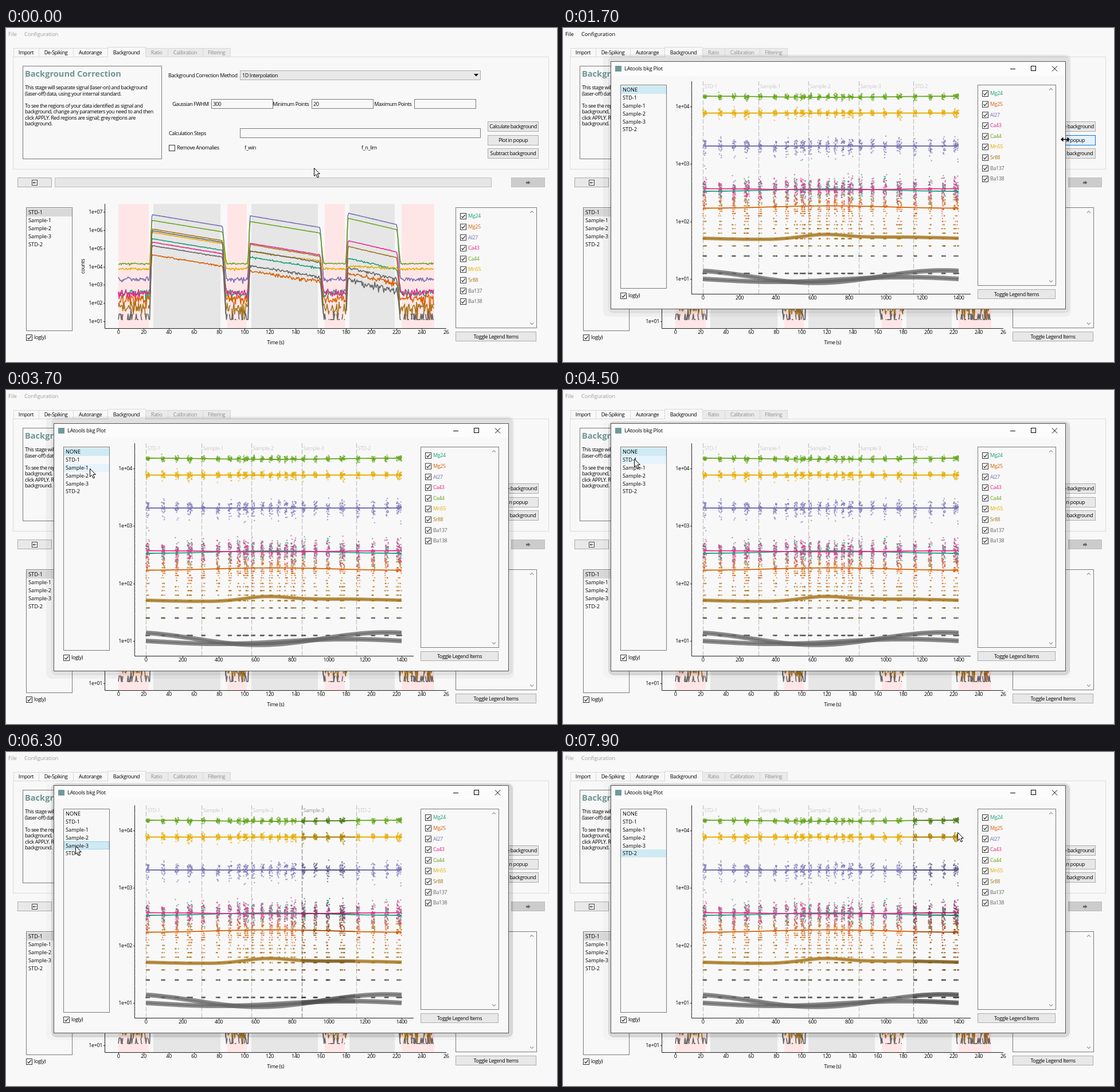
An HTML page with a canvas for the animation above (8 s loop, 961 by 583 pixels).

```html
<!DOCTYPE html>
<html lang="en">
<head>
<meta charset="utf-8">
<title>Background correction</title>
<style>
html, body { margin: 0; width: 100%; height: 100%; overflow: hidden; background: #f8f8f8; }
canvas { display: block; }
</style>
</head>
<body>
<canvas id="stage" width="961" height="583"></canvas>
<script>
const W = 961, H = 583, LOOP = 8000, BG = '#f8f8f8', EDGE = '#7a7a7a', ROW = 13.8;
const stage = document.getElementById('stage').getContext('2d');
let g = stage;

// ---------- drawing helpers ----------
function layer(draw) {
  const c = document.createElement('canvas');
  c.width = W; c.height = H;
  const old = g;
  g = c.getContext('2d');
  draw();
  g = old;
  return c;
}
function text(s, x, y, { color = '#000', align = 'left', size = 9, bold = false, space = -0.4 } = {}) {
  g.font = `${bold ? 'bold ' : ''}${size}px "Open Sans", "Noto Sans", sans-serif`;
  g.letterSpacing = space + 'px';
  g.textAlign = align;
  g.fillStyle = color;
  g.fillText(s, x, y + size * 0.36);
}
function box(x, y, w, h, fill, stroke) {
  if (fill) { g.fillStyle = fill; g.fillRect(x, y, w, h); }
  if (stroke) { g.strokeStyle = stroke; g.lineWidth = 1; g.strokeRect(x + 0.5, y + 0.5, w - 1, h - 1); }
}
function trail(p) {
  g.beginPath();
  for (let i = 0; i < p.length; i += 2) g.lineTo(p[i], p[i + 1]);
}
function line(color, width, ...p) {
  g.strokeStyle = color; g.lineWidth = width;
  trail(p); g.stroke();
}
function poly(fill, ...p) {
  g.fillStyle = fill;
  trail(p); g.closePath(); g.fill();
}
function button(label, x, y, w, h, hot) {
  box(x, y, w, h, hot ? '#e5f1fb' : '#e8e8e8', hot ? '#0078d7' : '#adadad');
  text(label, x + w / 2, y + h / 2, { align: 'center' });
}
function check(x, y, label, on = true, color) {
  box(x, y - 5, 11, 11, '#fff', '#333');
  if (on) line('#222', 1.2, x + 2.5, y + 0.5, x + 4.5, y + 3, x + 8.8, y - 2.2);
  text(label, x + 14, y, { color });
}
function chevron(x, y, d) { line('#999', 1.2, x - 3, y + d, x, y - d, x + 3, y + d); }
function list(names, x, y) {
  names.forEach((s, i) => text(s, x, y + i * ROW, { size: 9.2, space: 0 }));
}
function legend(x, y, w, h) {
  box(x, y, w, h, BG, EDGE);
  series.forEach((s, i) => check(x + 8, y + 15 + i * 18.63, s.name, true, s.color));
  chevron(x + w - 9, y + 8, 1.5);
  chevron(x + w - 9, y + h - 8, -1.5);
}

// ---------- data ----------
let seed = 7;
function rand() {
  seed = (seed + 0x6D2B79F5) | 0;
  let t = Math.imul(seed ^ seed >>> 15, 1 | seed);
  t = t + Math.imul(t ^ t >>> 7, 61 | t) ^ t;
  return ((t ^ t >>> 14) >>> 0) / 4294967296;
}
const gauss = () => Math.sqrt(-2 * Math.log(1 - rand())) * Math.cos(6.2832 * rand());
// a noisy reading in steps of 12.5, as log10, or null for zero
function reading(mean) {
  const n = mean / 12.5, spread = 1 + Math.min(1, n / 60);
  const k = Math.round(n + gauss() * Math.sqrt(n) * spread);
  return k > 0 ? Math.log10(k * 12.5) : null;
}
const smooth = v => (v = Math.max(0, Math.min(1, v)), v * v * (3 - 2 * v));
const mainY = log => 512 - (log - 1) * 31.8;
const popY = log => 438 - (log - 1) * 100.4;

// y: height of the background fit, cos, sin and bump: its bends, peaks: tops of the three signals
const series = [
  { name: 'Mg24', color: '#1b9e77', y: 283, cos: 2, peaks: [367, 399, 401] },
  { name: 'Mg25', color: '#d95f02', y: 312.5, cos: 2, peaks: [395, 424, 427] },
  { name: 'Al27', color: '#7570b3', y: 206, peaks: [325, 327, 322] },
  { name: 'Ca43', color: '#e7298a', y: 281.5, cos: -1, peaks: [373, 375, 370] },
  { name: 'Ca44', color: '#66a61e', y: 120, cos: -1, peaks: [335, 337, 331] },
  { name: 'Mn55', color: '#e6ab02', y: 148.5, peaks: [356, 391, 430] },
  { name: 'Sr88', color: '#a6761d', y: 367, sin: 2, bump: -7, band: 6, peaks: [350, 377, 380] },
  { name: 'Ba137', color: '#666666', y: 439, cos: -1, sin: 4, band: 8, peaks: [379, 414, 438] },
  { name: 'Ba138', color: '#666666', y: 434, cos: -10, sin: 4, band: 8, peaks: [353, 388, 417] }
];
for (const s of series) s.base = 10 ** (1 + (438 - s.y) / 100.4);
const spans = [[250, 377], [421, 547], [592, 681]];

// signal adds to the background; it drops 21 px over each span
function meanAt(s, x) {
  let log = Math.log10(s.base);
  spans.forEach(([a, b], i) => {
    const on = smooth((x - a) / 5) * smooth((b + 8 - x) / 8);
    const signal = 10 ** (1 + (512 - s.peaks[i] - 21 * (x - a) / (b - a)) / 31.8);
    log += on * Math.log10(1 + signal / s.base);
  });
  return 10 ** log;
}
function trace(s) {
  g.strokeStyle = s.color; g.lineWidth = 1.6; g.lineJoin = 'round';
  g.beginPath();
  let pen = false;
  for (let x = 196; x <= 747; x += 1.3) {
    const v = reading(meanAt(s, x));
    if (v !== null) pen ? g.lineTo(x, mainY(v)) : g.moveTo(x, mainY(v));
    pen = v !== null;
  }
  g.stroke();
}
function fitLine(s, color, width) {
  const p = [];
  for (let u = 0; u <= 1.001; u += 0.02) {
    const a = u * 2 * Math.PI;
    p.push(244 + 446 * u, s.y + (s.cos || 0) * Math.cos(a) + (s.sin || 0) * Math.sin(a)
      + (s.bump || 0) * Math.exp(-(((u - 0.47) / 0.12) ** 2)));
  }
  line(color, width, ...p);
}

// first and last gap, number of gaps, and how much their spacing shrinks
const samples = [
  { name: 'STD-1', x: 244, last: 316, gaps: 4, bend: 0.2 },
  { name: 'Sample-1', x: 341, last: 414, gaps: 5, bend: 0.55 },
  { name: 'Sample-2', x: 428, last: 497, gaps: 6, bend: 0.2 },
  { name: 'Sample-3', x: 516, last: 582, gaps: 4, bend: -0.1 },
  { name: 'STD-2', x: 611, last: 681, gaps: 4, bend: 0.2 }
];
const names = samples.map(s => s.name);

// ---------- main window ----------
const mainWindow = layer(() => {
  box(0, 0, W, H, BG);
  box(12, 50, 935, 197, BG, '#dcdcdc');
  const tabs = [['Import', 13], ['De-Spiking', 57], ['Autorange', 117], ['Background', 177],
    ['Ratio', 243], ['Calibration', 282], ['Filtering', 343]];
  tabs.forEach(([name, x], i) => {
    const end = i < 6 ? tabs[i + 1][1] : 391, on = i === 3, off = i > 3;
    box(x, on ? 33 : 35, end - x + 1, on ? 18 : 16, off ? '#eaeaea' : BG, '#d9d9d9');
    if (on) box(x + 1, 50, end - x - 1, 1, BG);
    text(name, (x + end) / 2, on ? 42.5 : 43, { align: 'center', color: off ? '#8f8f8f' : '#000' });
  });

  box(29, 66, 243, 163, BG, EDGE);
  text('Background Correction', 33, 80, { size: 14.6, bold: true, color: '#6f9595', space: 0 });
  ['This stage will separate signal (laser-on) and background',
    '(laser-off) data, using your internal standard.', '',
    'To see the regions of your data identified as signal and',
    'background, change any parameters you need to and then',
    'click APPLY. Red regions are signal; grey regions are',
    'background.'].forEach((s, i) => text(s, 33, 104 + i * 10.5));

  text('Background Correction Method', 283, 83);
  box(408, 74, 420, 17, '#e8e8e8', '#adadad');
  text('1D Interpolation', 412, 83);
  poly('#000', 816, 80, 824, 80, 820, 84.5);
  [['Gaussian FWHM', '300', 358], ['Minimum Points', '20', 533], ['Maximum Points', '', 712]]
    .forEach(([label, value, x]) => {
      text(label, x - 4.5, 133, { align: 'right' });
      box(x, 124, 108, 17, BG, EDGE);
      text(value, x + 3, 132.5);
    });
  text('Calculation Steps', 284, 184);
  box(408, 175, 420, 17, BG, EDGE);
  check(284, 209, 'Remove Anomalies', false);
  text('f_win', 416, 209);
  text('f_n_lim', 620, 209);
  ['Calculate background', 'Plot in popup', 'Subtract background']
    .forEach((s, i) => button(s, 840, Math.round(163.4 + i * 23.4), 89, 18));

  button('', 20, 261, 60, 17);
  box(45, 265, 10, 10, BG, '#444');
  line('#444', 1, 47, 270, 53, 270);
  poly('#444', 46.5, 270, 49.5, 268, 49.5, 272);
  box(85, 261, 762, 17, '#e6e6e6', '#c0c0c0');
  box(881, 261, 59, 17, '#cccccc', '#bfbfbf');
  poly('#666', 907, 268.5, 910.5, 268.5, 910.5, 266.5, 914.5, 270, 910.5, 273, 910.5, 271.5, 907, 271.5);

  box(35, 313, 81, 216, BG, EDGE);
  box(36, 315, 79, 14, '#d9d9d9');
  list(names, 39, 322);
  check(35, 540, 'log(y)');
  legend(784, 313, 142, 211);
  button('Toggle Legend Items', 784, 530, 141, 17);

  let end = 187;
  for (const [a, b] of [...spans, [748, 0]]) {
    box(end + 9, 307, a - end - 10, 217, '#ffe6e6');
    if (b) box(a + 7, 307, b - a - 10, 217, '#e6e6e6');
    end = b;
  }
  series.forEach(trace);
  line('#222', 1, 172.5, 307, 172.5, 524.5, 768, 524.5);
  for (let e = 1; e <= 7; e++) {
    const y = Math.round(mainY(e));
    line('#222', 1, 170, y + 0.5, 173, y + 0.5);
    text('1e+0' + e, 168, y, { align: 'right' });
  }
  for (let i = 0; i < 13; i++) {
    const x = Math.round(195.5 + i * 44.15);
    line('#222', 1, x + 0.5, 524, x + 0.5, 527);
    text(String(i * 20), x, 531, { align: 'center' });
  }
  text('26', 763, 531);
  text('Time (s)', 470, 549, { align: 'center' });
  g.save();
  g.translate(134, 416); g.rotate(-Math.PI / 2);
  text('counts', 0, 0, { align: 'center' });
  g.restore();
});

// ---------- popup ----------
const plot = layer(() => {
  for (const s of samples) {
    g.setLineDash([8, 3]);
    line('#c4c4c4', 1.3, s.x + 0.5, 93, s.x + 0.5, 464);
    g.setLineDash([]);
    text(s.name, s.x + 2.5, 102, { color: '#cbcbcb' });
  }
  g.globalAlpha = 0.6;
  for (const s of series) {
    g.fillStyle = s.color;
    for (const { x, last, gaps, bend } of samples) for (let i = 0; i < gaps; i++) {
      const u = i / (gaps - 1), start = x + (last - x) * (u + bend * u * (1 - u));
      const width = i === gaps - 1 ? 9 : 6;
      for (let k = width * 5; k > 0; k--) {
        const v = reading(s.base), dx = rand() * width;
        if (v === null) continue;
        g.beginPath();
        g.arc(start + dx, popY(v), 1.2, 0, 7);
        g.fill();
      }
    }
  }
  for (const s of series) {
    g.globalAlpha = 0.75;
    if (s.band) fitLine(s, s.color, s.band);
    g.globalAlpha = s.band ? 0.8 : 1;
    fitLine(s, s.color, 1.8);
  }
});
const shade = layer(() => {
  g.drawImage(plot, 0, 0);
  g.globalCompositeOperation = 'source-in';
  box(0, 0, W, H, '#000');
});

const popup = layer(() => {
  box(83, 58, 794, 433, BG, '#555');
  box(84, 59, 792, 24, '#fcfcfc');
  box(91, 66, 11, 10, '#6f9a9a');
  text('LAtools bkg Plot', 107, 71, { size: 9.4, space: -0.2 });
  line('#000', 1, 780, 71.5, 789, 71.5);
  box(816, 66, 9, 9, null, '#000');
  line('#000', 1, 853, 66.5, 862, 75.5);
  line('#000', 1, 862, 66.5, 853, 75.5);

  box(100, 99, 81, 356, BG, EDGE);
  check(100, 467, 'log(y)');
  legend(723, 99, 137, 351);
  button('Toggle Legend Items', 723, 456, 136, 17);

  g.drawImage(plot, 0, 0);
  line('#222', 1, 224.5, 93, 224.5, 464.5, 711, 464.5);
  for (let e = 0; e <= 4; e++) for (let m = 1; m < 10; m++) {
    const y = Math.round(popY(e + Math.log10(m)));
    if (y < 94 || y > 463) continue;
    line(m > 1 ? '#999' : '#222', 1, m > 1 ? 223 : 222, y + 0.5, 225, y + 0.5);
    if (m === 1) text('1e+0' + e, 220, y, { align: 'right' });
  }
  for (let i = 0; i < 8; i++) {
    const x = Math.round(244 + i * 63.7);
    line('#222', 1, x + 0.5, 464, x + 0.5, 467);
    text(String(i * 200), x, 471, { align: 'center' });
  }
});

// ---------- timeline ----------
// pointer moves: start, end, x, y
const moves = [[0, 0, 537, 244], [400, 1100, 876, 194], [1700, 2100, 560, 250], [3200, 3700, 146, 137],
  [3700, 4100, 128, 134], [4300, 4500, 124, 120], [4700, 4900, 122, 135], [5200, 5500, 119, 151],
  [5700, 6100, 121, 164], [6600, 6900, 122, 176], [7400, 7700, 430, 207], [7700, 7900, 688, 140]];
// each click picks the next row of the list
const clicks = [4700, 5200, 5600, 6300, 7000];

function pointerAt(t) {
  let x = 0, y = 0;
  for (const [from, to, mx, my] of moves) {
    if (t < from) break;
    const u = t >= to ? 1 : (t - from) / (to - from);
    x += (mx - x) * u;
    y += (my - y) * u;
  }
  return [x, y];
}
function arrow(x, y) {
  g.save();
  g.translate(Math.round(x) + 0.5, Math.round(y) + 0.5);
  poly('#fff', 0, 0, 0, 14, 3.2, 11, 5.7, 16.5, 8, 15.5, 5.6, 10, 9.8, 10);
  g.strokeStyle = '#000'; g.lineWidth = 1; g.stroke();
  g.restore();
}
function resizeArrow(x, y) {
  line('#000', 1.5, x - 6, y + 0.5, x + 6, y + 0.5);
  for (const d of [-1, 1]) poly('#000', x + 8 * d, y + 0.5, x + 3.5 * d, y - 3.5, x + 3.5 * d, y + 4.5);
}
function halo(x, y, w, h, alpha) {
  g.fillStyle = `rgba(0,0,0,${alpha})`;
  g.beginPath(); g.roundRect(x, y, w, h, 9); g.fill();
}
function drawPopup(t, px, py) {
  const wide = t < 4000;
  halo(70, wide ? 46 : 53, 816, wide ? 458 : 450, wide ? 0.04 : 0.02);
  halo(79, wide ? 48 : 55, 805, wide ? 450 : 443, wide ? 0.06 : 0.12);
  g.drawImage(popup, 0, 0);

  const sel = clicks.filter(c => c <= t).length;
  const hover = px > 100 && px < 181 ? Math.floor((py - 101) / ROW) : -1;
  const top = i => Math.round(101 + i * ROW);
  if (hover >= 0 && hover <= 5) box(101, top(hover), 79, 14, '#e5f3fd');
  box(101, top(sel), 79, 14, '#cfeaf3', hover === sel ? '#99d1f0' : null);
  list(['NONE', ...names], 104, 108);
  if (sel) {
    const x = samples[sel - 1].x - 1, w = (samples[sel]?.x ?? 695) - x - 2;
    g.globalAlpha = 0.25;
    g.drawImage(shade, x, 90, w, 374, x, 90, w, 374);
    g.globalAlpha = 1;
  }
}
function frame(now) {
  const t = Math.floor(now % LOOP / 100) * 100;
  const [x, y] = pointerAt(t), menu = { size: 9.3, space: 0, color: t >= 1700 && t < 3300 ? '#000' : '#9a9a9a' };
  g.drawImage(mainWindow, 0, 0);
  text('File', 4, 10.5, menu);
  text('Configuration', 32, 10.5, menu);
  if (t >= 1100 && t < 1800) button('Plot in popup', 840, 187, 89, 18, true);
  if (t >= 1700) drawPopup(t, x, y);
  t === 1700 ? resizeArrow(x, y) : arrow(x, y);
  requestAnimationFrame(frame);
}
requestAnimationFrame(frame);
</script>
</body>
</html>
```
